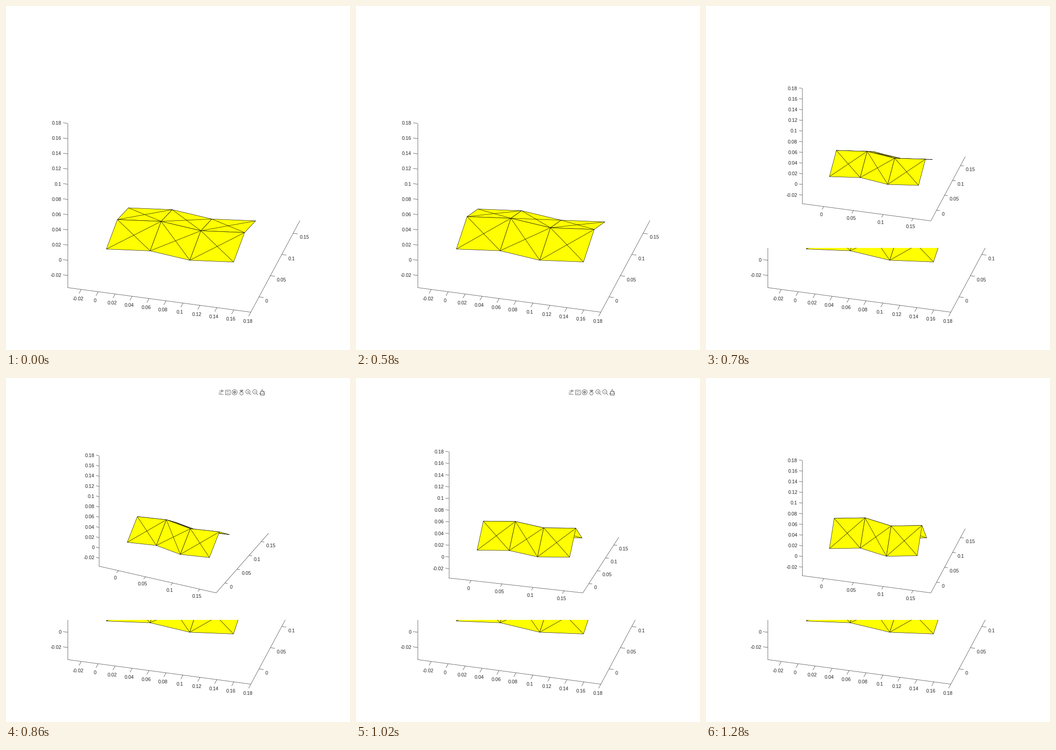
Recreate the animation shown at these times as a matplotlib script. Size 748x748 px, loop 1.3 s.

```python
import numpy as np
import matplotlib.pyplot as plt
from matplotlib.animation import FuncAnimation
from matplotlib.collections import LineCollection, PolyCollection
from matplotlib.patches import Rectangle

SIZE, DPI = 748, 100
PX = 72 / DPI                      # points per pixel
STEP = 20                          # ms per frame
FRAMES = 65
FOLD_START, SHRINK = 500, 600      # ms
SMALL_H = 525                      # height of the shrunken view
LOW, HIGH = -0.036, 0.18           # limits shared by all three axes
SIDE = 0.05                        # panel side length
GAMMA = np.radians(80)             # panel corner angle
HOME, ASIDE, NEAR_HOME = np.array([(15, 30), (102.6, 35.8), (15, 24.5)])
INK = "#262626"
FONT = 10.67


class Camera:
    """Orthographic view fitted to the axes area of a given height."""

    def __init__(self, az, el, height):
        a, e = np.radians([az, el])
        self.ca, self.sa, ce, se = np.cos(a), np.sin(a), np.cos(e), np.sin(e)
        span = ce + se * (abs(self.ca) + abs(self.sa))
        scale = 0.815 * height / (HIGH - LOW) / span
        self.center = np.array([0.5175 * SIZE - 0.5, 0.4825 * height])
        self.matrix = scale * np.array([
            [self.ca, self.sa, 0],
            [self.sa * se, -self.ca * se, -ce]])
        self.toward = np.array([self.sa * ce, -self.ca * ce, se])

    def project(self, points):
        return (np.asarray(points) - (LOW + HIGH) / 2) @ self.matrix.T + self.center


def folded_sheet(theta):
    """Vertices [column, row] of a Miura sheet with 3 by 2 panels."""
    k = np.cos(theta) * np.tan(GAMMA)
    root = np.sqrt(1 + k * k)
    dx, shift = SIDE * k / root, SIDE / root
    rise = SIDE * np.sin(theta) * np.sin(GAMMA)
    dy = np.sqrt(SIDE ** 2 - rise ** 2)
    return np.array([[(i * dx, j * dy + i % 2 * shift, j % 2 * rise)
                      for j in range(3)] for i in range(4)])


def draw_sheet(cam, theta, z):
    grid = folded_sheet(theta)
    panels = [grid[[i, i + 1, i + 1, i], [j, j, j + 1, j + 1]]
              for i in range(3) for j in range(2)]
    panels.sort(key=lambda p: p.mean(axis=0) @ cam.toward)
    shapes = []
    for panel in panels:
        flat = cam.project(panel)
        shapes += [flat, flat[::2], flat[1::2]]
    ax.add_collection(PolyCollection(shapes, facecolor="yellow", edgecolor="black",
                                     linewidth=0.67 * PX, joinstyle="round", zorder=z))


def label(x, y, value, ha, z):
    ax.text(x, y + 0.36 * FONT, f"{value:g}", ha=ha, va="baseline", color=INK,
            family="Liberation Sans", fontsize=FONT * PX, zorder=z)


def tick_values(step):
    first = np.ceil(LOW / step - 1e-6)
    last = np.floor(HIGH / step + 1e-6)
    return [round(k * step, 2) + 0.0 for k in np.arange(first, last + 1)]


def draw_axes(cam, z):
    front_x = HIGH if cam.sa > 0 else LOW
    front_y = LOW if cam.ca > 0 else HIGH
    corners = [(x, y, LOW) for x in (LOW, HIGH) for y in (LOW, HIGH)]
    left = min(corners, key=lambda c: cam.project(c)[0])
    bases = [(LOW, front_y, LOW), (front_x, LOW, LOW), left]
    lengths = np.hypot(*cam.matrix) * (HIGH - LOW)
    tick_len = 0.025 * lengths.max()

    # each axis has its ticks along a neighbouring axis, pointing outward
    out_x = cam.matrix[:, 0] * np.sign(cam.sa)
    out_y = cam.matrix[:, 1] * -np.sign(cam.ca)
    wide = 0 if abs(cam.ca) > abs(cam.sa) else 1
    out_z = -cam.matrix[:, wide] * np.sign(cam.matrix[0, wide])

    lines = []
    for axis, outward in enumerate((out_y, out_x, out_z)):
        outward = outward / np.hypot(*outward)

        def at(value):
            point = np.array(bases[axis], float)
            point[axis] = value
            return cam.project(point)

        lines.append([at(LOW), at(HIGH)])
        step = 0.02 if axis == 2 or lengths[axis] > 300 else 0.05
        for value in tick_values(step):
            start = at(value)
            end = start + outward * tick_len
            lines.append([start, end])
            if axis == 2:
                label(end[0] - 3.5, end[1] + 0.5, value, "right", z)
            elif outward[0] > 0.7:
                label(end[0] + 4, end[1] + 7, value, "left", z)
            elif outward[0] < -0.7:
                label(end[0] - 4, end[1] + 7, value, "right", z)
            else:
                x, y = end + outward * 4 + (0, 7)
                label(x, y, value, "center", z)
    ax.add_collection(LineCollection(lines, colors=INK, linewidths=0.67 * PX, zorder=z))


def ngon(r, n=24, x=0, y=0, start=0.0):
    a = 2 * np.pi * (np.arange(n + 1) / n + start)
    return np.column_stack([x + r * np.cos(a), y + r * np.sin(a)])


def bar(y, half, x=0):
    return np.array([(x - half, y), (x + half, y)])


def draw_toolbar(z):
    export = [bar(4, 5), ngon(2.5, 3, 3, -3), bar(-3, 3, -1), bar(0.5, 3, -2)]
    note = [ngon(7.5, 4, start=1 / 8), bar(-2, 2.5), bar(1.5, 2.5)]
    rotate = [ngon(r) for r in (5.7, 2.6, 1.2)]
    hand = [ngon(3.6, y=2.4)]
    for tilt in np.linspace(-0.7, 0.7, 5):
        finger = np.array([np.sin(tilt), -np.cos(tilt)])
        hand.append([finger * 1.5, finger * 6])
    zoom_out = [ngon(4.6, x=-1, y=-1), [(2.4, 2.4), (6, 6)], bar(-1, 2.2, -1)]
    zoom_in = zoom_out + [bar(-1, 2.2, -1)[:, ::-1]]
    house = [ngon(6.5, 3, y=0.5, start=-1 / 4), ngon(5.4, 4, y=2, start=1 / 8)]

    icons = (export, note, rotate, hand, zoom_in, zoom_out, house)
    strokes = [np.array(s) + (467 + 15 * k, 31)
               for k, icon in enumerate(icons) for s in icon]
    ax.add_collection(LineCollection(strokes, colors="#6a6a6a",
                                     linewidths=PX, zorder=z))


def fold_angle(time):
    n = max((time - FOLD_START) / STEP, -1)
    return np.radians(14.9 + 1.15 * n - 0.0035 * n * n)


def ease(time, start, end):
    t = np.clip((time - start) / (end - start), 0, 1)
    return t * t * (3 - 2 * t)


def view_angles(time):
    """Swing to the side, drag back close to the start, then snap home."""
    if time >= 1060:
        return HOME
    out, back = ease(time, 840, 940), ease(time, 940, 1020)
    return HOME + (ASIDE - HOME) * out + (NEAR_HOME - ASIDE) * back


def draw_view(time, height, z):
    cam = Camera(*view_angles(time), height)
    draw_axes(cam, z)
    draw_sheet(cam, fold_angle(time), z + 1)


def draw(frame):
    time = frame * STEP
    ax.clear()
    ax.set_xlim(0, SIZE)
    ax.set_ylim(SIZE, 0)
    ax.axis("off")
    draw_view(min(time, SHRINK - STEP), SIZE, 1)
    if time >= SHRINK:
        # the small view covers only the upper part of the large one
        ax.add_patch(Rectangle((0, 0), SIZE, SMALL_H + 1, color="white", lw=0, zorder=5))
        draw_view(time, SMALL_H, 6)
        if 820 <= time < 1200:
            draw_toolbar(8)
    return []


fig = plt.figure(figsize=(SIZE / DPI, SIZE / DPI), dpi=DPI, facecolor="white")
ax = fig.add_axes([0, 0, 1, 1])
anim = FuncAnimation(fig, draw, frames=FRAMES, interval=STEP, init_func=lambda: [],
                     repeat=True, repeat_delay=0)
plt.show()
```
